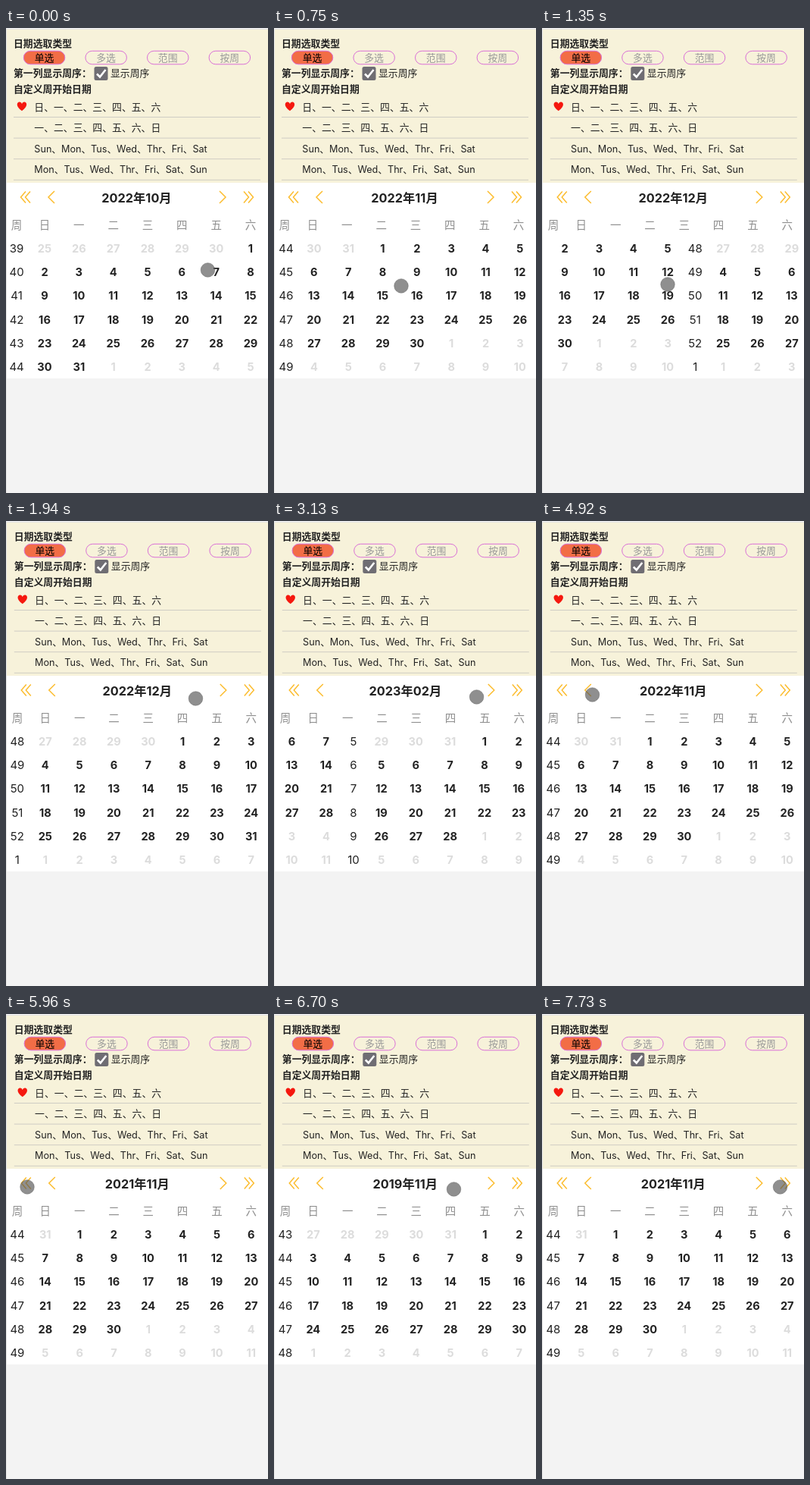
An HTML page for the animation above (8 s loop, 346 by 613 pixels).

```html
<!DOCTYPE html>
<html lang="zh-CN">
<head>
<meta charset="utf-8">
<style>
  html, body { margin: 0; width: 100%; height: 100%; overflow: hidden; background: #f3f3f3; }
  svg { display: block; width: 346px; height: 613px; }
  text { font-family: Inter, "Noto Sans CJK SC", "Noto Sans CJK", sans-serif; font-size: 12.85px; fill: #222; }
  .b { font-weight: 700; }
  .mid text, .mid { text-anchor: middle; }
  .latin { font-size: 12.65px; }
  .pill { fill: none; stroke: #da70d6; }
  .head text { font-size: 14.5px; fill: #8f8f8f; }
  .day { font-size: 14.6px; font-weight: 700; }
  .out { fill: #dcdcdc; }
  .week { font-size: 15px; }
  .arrow { fill: none; stroke: #fcbd2f; stroke-width: 1.5; }
</style>
</head>
<body>
<svg viewBox="0 0 346 613">
  <rect width="346" height="613" fill="#f3f3f3"/>
  <rect x="1" y="2" width="345" height="202" fill="#f7f2da"/>
  <rect x="1" y="204" width="345" height="258" fill="#fff"/>
  <path d="M.5 0V613M0 1.5H346" stroke="#e4e4e4"/>
  <g id="page">
    <text class="b" x="10" y="24.5">日期选取类型</text>
    <g id="pills" class="mid"></g>
    <text class="b" x="10" y="64.2">第一列显示周序：</text>
    <rect x="116.5" y="51" width="18" height="18" rx="2.5" fill="#6f6d73"/>
    <path d="M120 60.5l4 4 7.5-9.5" fill="none" stroke="#fff" stroke-width="2.6"/>
    <text x="138" y="64.2">显示周序</text>
    <text class="b" x="10" y="85.1">自定义周开始日期</text>
    <path d="M21 109.3C12 103 14.5 97.3 18.200 97.6Q20.400 98 21 100Q21.600 98 23.800 97.6C27.500 97.3 30 103 21 109.3Z" fill="#f5180f"/>
    <g id="options"></g>
    <g id="arrows" class="arrow">
      <path d="M26 215.5L19.5 223L26 230.5M32 215.5L25.5 223L32 230.5M64 215L56 223L64 231"/>
    </g>
    <text id="title" class="b mid" x="172.5" y="230" style="font-size:16.3px"></text>
    <g id="head" class="head mid"></g>
    <g id="months" class="mid"></g>
  </g>
  <circle id="cursor" r="9.300" fill="#555" fill-opacity=".66" stroke="#555" stroke-opacity=".4"/>
</svg>
<script>
const $ = id => document.getElementById(id);
const LOOP = 8000, STEP = 148.75, WIDTH = 345, DAY = 864e5;
const START = 2022 * 12 + 9;
const colX = i => 51 + 45.33 * i;

const smooth = p => p * p * (3 - 2 * p);
const easeOut = p => 1 - (1 - p) ** 3;
const clamp = p => Math.min(1, Math.max(0, p));

// [time, months, duration, easing]; a swipe is a drag plus a release
const swipe = (t, len) => [[t, .284, len, smooth], [t + len, .716, 440, easeOut]];
const click = (t, dir) => [t, dir, 440, easeOut];
const jump = (t, years) => [t, years * 12, 1, easeOut];
const moves = [
  ...swipe(60, 330), ...swipe(1040, 260),
  click(2400, 1), click(2965, 1),
  click(3600, -1), click(4000, -1), click(4420, -1),
  jump(5600, -1), jump(6050, -1), jump(6385, -1),
  jump(7200, 1), jump(7570, 1)
];

// [time, x, y]
const path = [
  [0, 266.5, 319], [60, 266.5, 319], [390, 168, 340], [760, 168, 340],
  [950, 264, 330], [1040, 264, 330], [1300, 166, 338], [1500, 166, 338],
  [1934, 250.5, 234], [2150, 278, 227], [2920, 278, 227], [3124, 267.6, 232],
  [3500, 66.5, 229], [5080, 66.5, 229], [5400, 28, 228], [6450, 28, 228],
  [6694, 237.5, 231], [6860, 314.5, 228], [LOOP, 314.5, 228]
];

function cursorAt(t) {
  const i = path.findIndex(k => k[0] > t);
  const a = path[i - 1], b = path[i];
  const p = smooth((t - a[0]) / (b[0] - a[0]));
  return [1, 2].map(n => a[n] + (b[n] - a[n]) * p);
}

function monthMarkup(month, dx) {
  const year = Math.floor(month / 12), m = month % 12;
  const first = new Date(Date.UTC(year, m, 1));
  let out = `<g transform="translate(${dx})">`;
  for (let r = 0; r < 6; r++) {
    const y = 295.6 + 31.3 * r;
    const sunday = new Date(+first + (r * 7 - first.getUTCDay()) * DAY);
    const week = Math.floor((sunday - Date.UTC(sunday.getUTCFullYear(), 0, 1)) / DAY / 7) + 1;
    out += `<text class="week" x="14.1" y="${y}">${week}</text>`;
    for (let c = 0; c < 7; c++) {
      const d = new Date(+sunday + c * DAY);
      const cls = d.getUTCMonth() === m ? 'day' : 'day out';
      out += `<text class="${cls}" x="${colX(c)}" y="${y}">${d.getUTCDate()}</text>`;
    }
  }
  return out + '</g>';
}

function buildPage() {
  $('pills').innerHTML = ['单选', '多选', '范围', '按周'].map((s, i) => {
    const x = 23.3 + 81.6 * i;
    return `<rect class="pill" x="${x}" y="30.3" width="54.5" height="17.5" rx="8.75"${i ? '' : ' style="fill:#f26d46"'}/>
      <text x="${x + 27.2}" y="43.9" style="fill:${i ? '#999' : '#000'}">${s}</text>`;
  }).join('');
  const days = ['日', '一', '二', '三', '四', '五', '六'];
  const names = ['Sun', 'Mon', 'Tus', 'Wed', 'Thr', 'Fri', 'Sat'];
  const rotate = a => [...a.slice(1), a[0]];
  $('options').innerHTML = [days, rotate(days), names, rotate(names)].map((a, i) => {
    const y = 27.6 * i;
    return `<text class="${i > 1 ? 'latin' : ''}" x="37.3" y="${108.5 + y}">${a.join('、')}</text>
      <path d="M10 ${117.5 + y}H336" stroke="#cfccc4"/>`;
  }).join('');
  $('head').innerHTML = ['周', ...days].map((s, i) =>
    `<text x="${i ? colX(i - 1) : 14.1}" y="265.2">${s}</text>`).join('');
  $('arrows').innerHTML += `<g transform="translate(346) scale(-1 1)">${$('arrows').innerHTML}</g>`;
}

function draw(t) {
  let pos = START, target = START;
  for (const [at, n, len, ease] of moves) {
    if (t < at) continue;
    pos += n * ease(clamp((t - at) / len));
    target += n;
  }
  pos = Math.round(pos * 1e5) / 1e5;
  target = Math.round(target);
  const left = Math.floor(pos);
  $('months').innerHTML = [left, left + 1].map(k => monthMarkup(k, (k - pos) * WIDTH)).join('');
  const month = String(target % 12 + 1).padStart(2, '0');
  $('title').textContent = `${Math.floor(target / 12)}年${month}月`;
  $('page').setAttribute('transform', `translate(${.8 * clamp((t - 900) / 290)})`);
  $('cursor').setAttribute('transform', `translate(${cursorAt(t)})`);
}

buildPage();
const begin = performance.now();
let shown = -1;
function tick() {
  const t = (performance.now() - begin) % LOOP;
  const step = Math.floor(t / STEP + .03);
  if (step !== shown) draw(step * STEP);
  shown = step;
  requestAnimationFrame(tick);
}
tick();
</script>
</body>
</html>
```
